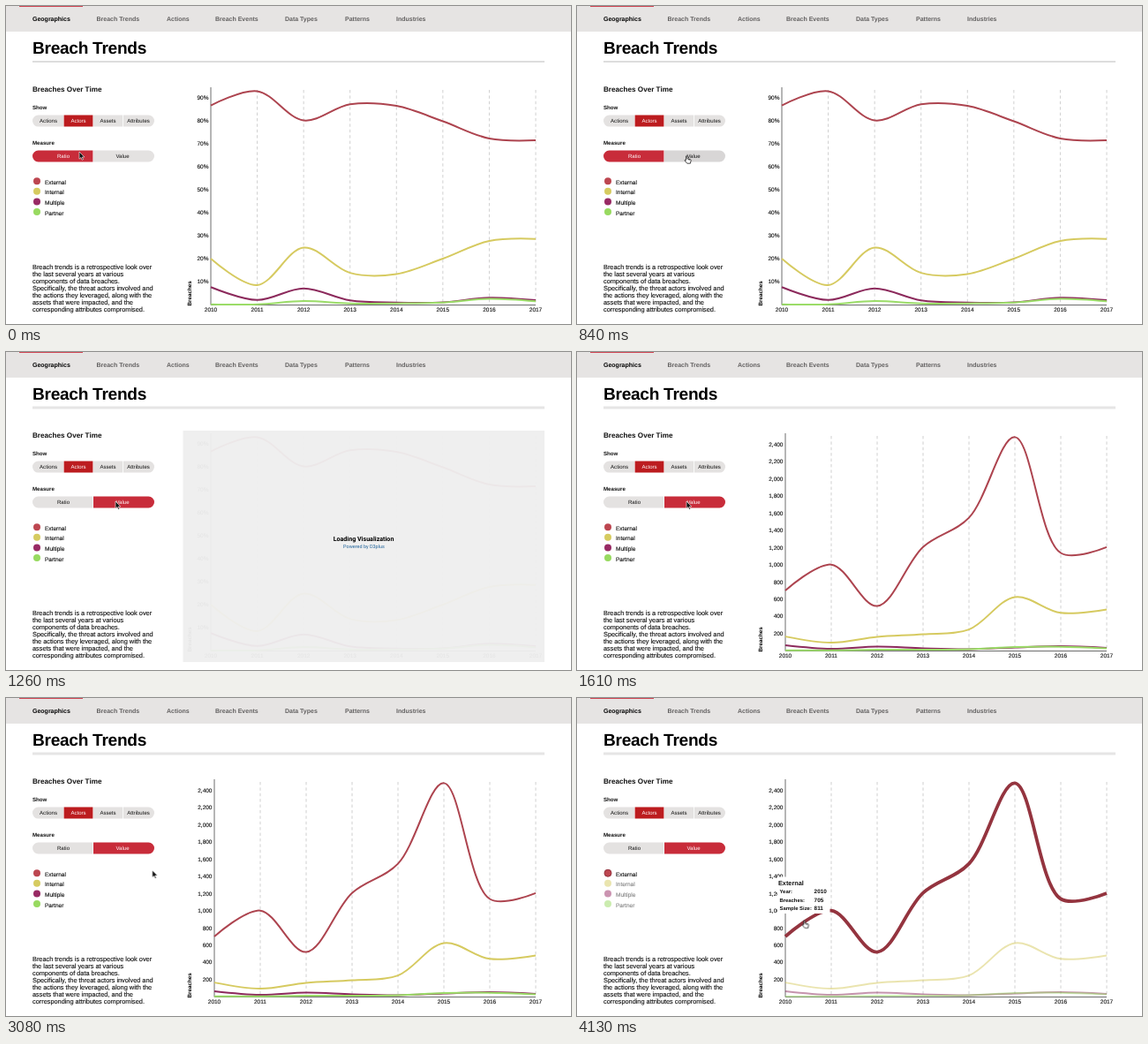
Animation, 640 px wide and 360 px high, one loop 4.2 s. Source, as an HTML page:

```html
<!DOCTYPE html>
<html lang="en">
<head>
<meta charset="utf-8">
<title>Breach Trends</title>
<style>
html, body { margin: 0; height: 100%; overflow: hidden; background: #fff; }
svg { display: block; width: 100vw; height: 100vh; font-family: "Liberation Sans", Arial, sans-serif; text-rendering: geometricPrecision; }
.b { font-weight: 700; }
.mid { text-anchor: middle; }
.end { text-anchor: end; }
.ink text { stroke: #111; stroke-width: .13; }
.line { fill: none; stroke-width: 2; }
.grid { stroke: #cbcbcb; stroke-width: .9; stroke-dasharray: 3.4 3; }
.axis { stroke: #6c6c6c; stroke-width: 1; }
.load { font-family: Roboto, "Open Sans", sans-serif; text-anchor: middle; }

/* One loop is 4200 ms. Hard switches use step-end. */
.cut { animation: 4200ms step-end infinite; }
.ratio { animation-name: ratio; }
.value { animation-name: value; }
.thin { animation-name: thin; }
.thick { animation-name: thick; }
.dim { animation-name: dim; }
.strong { animation-name: strong; }
.ring { animation-name: ring; }
.tip { animation-name: tip; }
.ratioSeg { animation-name: ratioSeg; }
.valueSeg { animation-name: valueSeg; }
.ratioText { animation-name: ratioText; }
.valueText { animation-name: valueText; }
.arrow { animation-name: arrow; }
.hand { animation-name: hand; }
.overlay { animation: overlay 4200ms linear infinite; }
.cursor { animation: cursor 4200ms ease-in-out infinite; }

@keyframes ratio { 0% { visibility: visible } 33.1%, 100% { visibility: hidden } }
@keyframes value { 0% { visibility: hidden } 33.1%, 100% { visibility: visible } }
@keyframes thin { 0% { visibility: visible } 23.3%, 100% { visibility: hidden } }
@keyframes thick { 0% { visibility: hidden } 23.3%, 100% { visibility: visible } }
@keyframes dim { 0% { opacity: 1 } 81.4%, 100% { opacity: .5 } }
@keyframes strong { 0% { stroke: #ad444f; stroke-width: 2 } 81.4%, 100% { stroke: #94343f; stroke-width: 3.8 } }
@keyframes ring { 0% { stroke: none } 81.4%, 100% { stroke: #94343f } }
@keyframes tip { 0% { visibility: hidden } 81.4%, 100% { visibility: visible } }
@keyframes ratioSeg { 0% { fill: #c82c3a } 23.3% { fill: #bc1c1f } 28.3%, 100% { fill: #e4e2e1 } }
@keyframes valueSeg { 0% { fill: #e4e2e1 } 3.8% { fill: #d8d6d6 } 28.3%, 100% { fill: #c82c3a } }
@keyframes ratioText { 0% { fill: #fff } 23.3%, 100% { fill: #111 } }
@keyframes valueText { 0% { fill: #111 } 23.3%, 100% { fill: #fff } }
@keyframes arrow { 0% { visibility: visible } 3.8% { visibility: hidden } 23.3% { visibility: visible } 81.4%, 100% { visibility: hidden } }
@keyframes hand { 0% { visibility: hidden } 3.8% { visibility: visible } 23.3% { visibility: hidden } 81.4%, 100% { visibility: visible } }
@keyframes overlay { 0%, 23.3% { opacity: 0 } 26.2%, 33.1% { opacity: 1 } 36.4%, 100% { opacity: 0 } }
@keyframes cursor {
  0% { transform: translate(83px, 165px) }
  8.3%, 22% { transform: translate(123px, 169px) }
  24%, 55% { transform: translate(124px, 169px) }
  59%, 69% { transform: translate(127px, 171px) }
  80.5%, 100% { transform: translate(256.3px, 251.2px) }
}
</style>
</head>
<body>
<svg id="stage" viewBox="0 0 640 360">
  <rect width="640" height="29" fill="#e6e4e3"/>
  <rect x="15" width="72" height="1" fill="#cf4552"/>
  <g id="nav" class="b" font-size="7"></g>

  <text class="b" x="30" y="54" font-size="19.1" letter-spacing="-.28">Breach Trends</text>
  <rect class="cut thin" x="30" y="62.5" width="580" height="1" fill="#bcbcbc"/>
  <rect class="cut thick" x="30" y="61.5" width="580" height="3" fill="#e6e5e5"/>

  <g class="b" fill="#111">
    <text x="30" y="97" font-size="8.15">Breaches Over Time</text>
    <text x="30" y="117" font-size="6.15">Show</text>
    <text x="30" y="157" font-size="6.15">Measure</text>
  </g>

  <clipPath id="pills">
    <rect x="30" y="123.6" width="138" height="13" rx="6.5"/>
    <rect x="30" y="163.5" width="138" height="13" rx="6.5"/>
  </clipPath>
  <g clip-path="url(#pills)" fill="#e4e2e1">
    <path d="M30 123h35v14H30zM99 123h33.2v14H99zM133 123h35v14h-35z"/>
    <path d="M65.6 123h32.8v14H65.6z" fill="#bc1c1f"/>
    <path class="cut ratioSeg" d="M30 163h68.4v14H30z"/>
    <path class="cut valueSeg" d="M99 163h69v14H99z"/>
  </g>
  <g class="mid" font-size="6.05" fill="#111">
    <text x="48" y="132.2">Actions</text>
    <text x="82" y="132.2" fill="#fff">Actors</text>
    <text x="115.5" y="132.2">Assets</text>
    <text x="150" y="132.2">Attributes</text>
    <text class="cut ratioText" x="65" y="172.2">Ratio</text>
    <text class="cut valueText" x="132" y="172.2">Value</text>
  </g>

  <g id="legend" class="ink" font-size="6.5" fill="#111"></g>
  <g id="about" class="ink" font-size="7.35" fill="#111"></g>

  <g id="charts" class="ink" font-size="6.5" fill="#111"></g>
  <text class="b" transform="translate(209.5 339.5) rotate(-90)" font-size="6.3">Breaches</text>

  <g class="cut tip b" font-size="5.9" fill="#111">
    <rect x="227" y="202.5" width="59.5" height="41.5" fill="#fff"/>
    <text x="228" y="211.8" font-size="7.3">External</text>
    <g id="facts"></g>
  </g>

  <g class="overlay">
    <rect x="200.5" y="89" width="409.5" height="262" fill="#efefef" fill-opacity=".96"/>
    <text class="load b" x="405" y="214.3" font-size="7.1">Loading Visualization</text>
    <text class="load" x="405.5" y="222" font-size="5.5" fill="#1f6299">Powered by D3plus</text>
  </g>

  <g class="cursor" stroke-linejoin="round">
    <path class="cut arrow" d="M0 0V8.2L1.9 6.5 3.2 9.3 4.5 8.7 3.2 6H5.8Z" fill="#111" stroke="#fff" stroke-width=".6"/>
    <path class="cut hand" d="M.5 5.5V.9Q1.2-.1 1.9.9V3.8L5.4 4.5Q6.3 5 6.1 6L5.4 9.2H1.7L-1 5.9Q-1 4.6 .5 5.5ZM3.2 4.2v1.2M4.6 4.5v1.1" fill="#fff" stroke="#111" stroke-width=".75"/>
  </g>
</svg>
<script>
const NS = "http://www.w3.org/2000/svg";
const BASE = 338, RIGHT = 600;
const byId = id => document.getElementById(id);

function add(parent, tag, attrs, text) {
  const el = document.createElementNS(NS, tag);
  for (const key in attrs) el.setAttribute(key, attrs[key]);
  if (text !== undefined) el.textContent = text;
  return parent.appendChild(el);
}

const series = [
  { name: "External", color: "#ad444f", dot: "#bd4650", cls: "cut strong",
    ratio: [86.7, 92.9, 80.2, 87.2, 86.5, 79.8, 72.3, 71.5],
    value: [699, 1000, 518, 1205, 1545, 2482, 1135, 1203] },
  { name: "Internal", color: "#d6ca60", dot: "#d6cb60", cls: "cut dim",
    ratio: [20, 8.5, 24.8, 13.8, 13.3, 20, 27.7, 28.6],
    value: [163, 92, 160, 190, 245, 622, 438, 478] },
  { name: "Multiple", color: "#8c2a5c", dot: "#982a64", cls: "cut dim",
    ratio: [7.6, 2, 7, 1.8, 0.9, 1, 3, 1.9],
    value: [62, 20, 46, 26, 16, 36, 51, 31] },
  { name: "Partner", color: "#9bdc68", dot: "#98da60", cls: "cut dim",
    ratio: [0.1, 0.1, 1.5, 0.5, 0.5, 0.9, 2.5, 1.4],
    value: [2, 2, 10, 10, 15, 40, 44, 26] }
];

// Centripetal Catmull-Rom spline written as cubic Béziers.
function spline(pts) {
  const gap = (a, b) => Math.sqrt(Math.hypot(b[0] - a[0], b[1] - a[1]));
  const tangent = i => {
    const a = pts[i - 1], p = pts[i], b = pts[i + 1];
    if (!a || !b) return null;
    const u = gap(a, p), v = gap(p, b);
    return [0, 1].map(k => (p[k] - a[k]) / u - (b[k] - a[k]) / (u + v) + (b[k] - p[k]) / v);
  };
  let d = "M" + pts[0];
  for (let i = 1; i < pts.length; i++) {
    const p = pts[i - 1], q = pts[i], s = gap(p, q) / 3;
    const m = tangent(i - 1), n = tangent(i);
    const c1 = m ? p.map((v, k) => v + m[k] * s) : p;
    const c2 = n ? q.map((v, k) => v - n[k] * s) : q;
    d += "C" + [c1, c2, q].join(" ");
  }
  return d;
}

function chart(key, left, unit, step, count, label) {
  const g = add(byId("charts"), "g", { class: "cut " + key });
  const x = i => left + (RIGHT - left) * i / 7;
  const y = v => BASE - v * unit;
  for (let i = 0; i < 8; i++) {
    if (i) add(g, "path", { class: "grid", d: `M${x(i)} 95V${BASE}` });
    add(g, "text", { class: "mid", x: x(i), y: 345.7 }, 2010 + i);
  }
  for (let i = 1; i <= count; i++)
    add(g, "text", { class: "end", x: left - 2.5, y: y(i * step) + 2.4 }, label(i * step));
  add(g, "path", { class: "axis", fill: "none", d: `M${left} 92V${BASE + .5}H${RIGHT}` });
  for (const s of series)
    add(g, "path", { class: "line " + s.cls, stroke: s.color, d: spline(s[key].map((v, i) => [x(i), y(v)])) });
}

chart("ratio", 232, 2.6, 10, 9, v => v + "%");
chart("value", 236, 0.09735, 200, 12, v => v.toLocaleString("en-US"));

[["Geographics", 30], ["Breach Trends", 102.5], ["Actions", 182], ["Breach Events", 237],
 ["Data Types", 316], ["Patterns", 384], ["Industries", 442]].forEach(([name, x], i) =>
  add(byId("nav"), "text", { x, y: 17, fill: i ? "#626060" : "#000" }, name));

series.forEach((s, i) => {
  const row = add(byId("legend"), "g", { class: i ? "cut dim" : "" });
  const y = 198.2 + i * 11.6;
  add(row, "circle", { class: i ? "" : "cut ring", cx: 35, cy: y, r: 4, fill: s.dot });
  add(row, "text", { x: 44, y: y + 3.5 }, s.name);
});

["Breach trends is a retrospective look over", "the last several years at various",
 "components of data breaches.", "Specifically, the threat actors involved and",
 "the actions they leveraged, along with the", "assets that were impacted, and the",
 "corresponding attributes compromised."].forEach((line, i) =>
  add(byId("about"), "text", { x: 30, y: 297.5 + i * 8 }, line));

[["Year:", "2010"], ["Breaches:", "705"], ["Sample Size:", "811"]].forEach(([name, v], i) => {
  const y = 221.1 + i * 9.5;
  add(byId("facts"), "text", { x: 229.5, y }, name);
  add(byId("facts"), "text", { x: 268.6, y, "font-size": 6.4 }, v);
});
</script>
</body>
</html>
```
